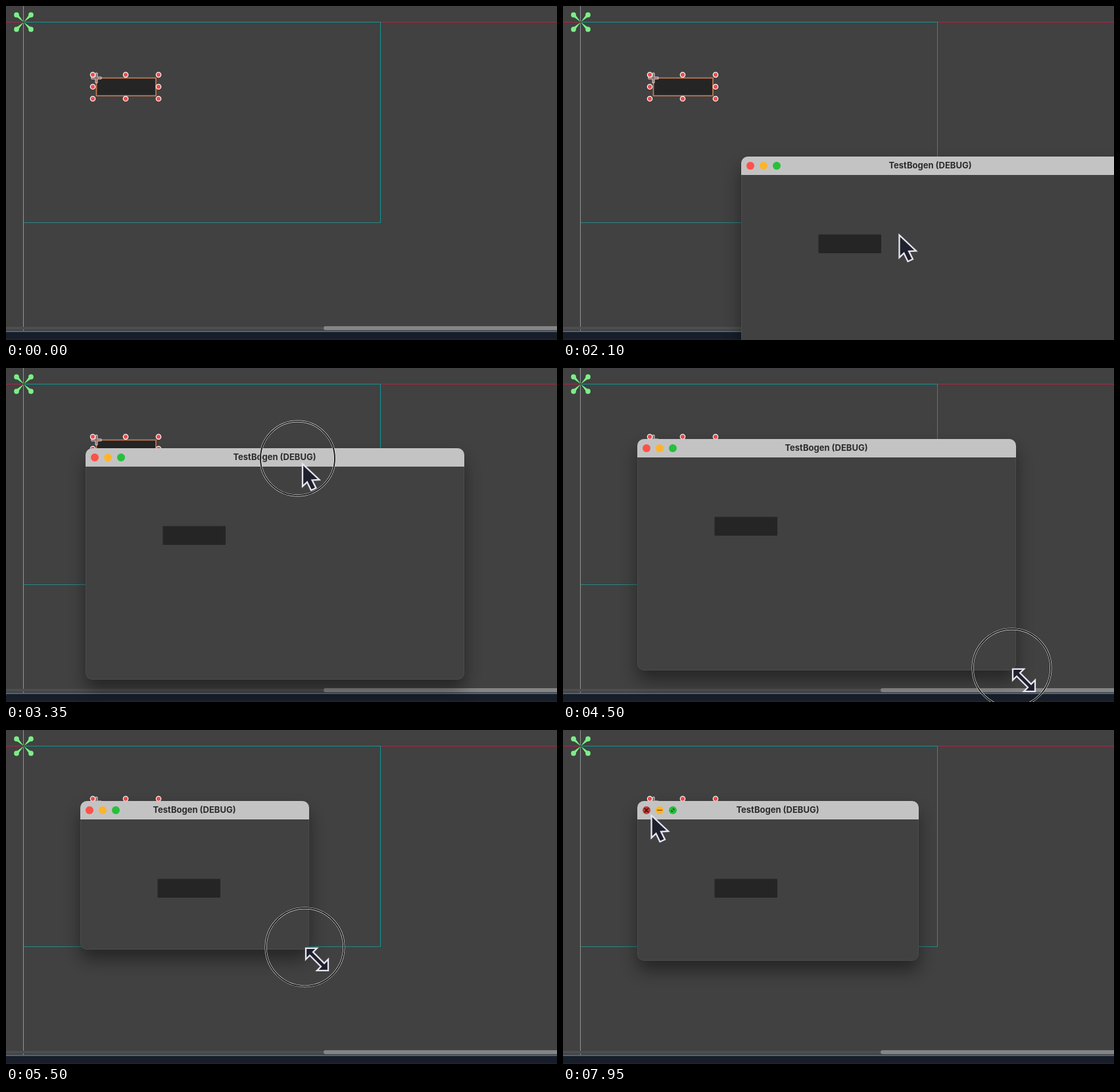
An HTML page that plays this animation: 838x508 px, repeating every 8 s.

```html
<!DOCTYPE html>
<html lang="de">
<head>
<meta charset="utf-8">
<title>Fenster ziehen</title>
<style>
html, body { margin: 0; width: 100%; height: 100%; overflow: hidden; background: #414141; }
svg { display: block; width: 100%; height: 100%; }
text { font: 700 13px Inter, "Open Sans", sans-serif; fill: #2b2b2b; text-anchor: middle; }
.cursor { fill: #1e202d; stroke: #e6e6f0; stroke-width: 2.3; }
.glyph { fill: none; stroke-width: 1.4; stroke-linecap: round; }
</style>
</head>
<body>
<svg viewBox="0 0 838 508">
  <defs>
    <filter id="blur" x="-30%" y="-30%" width="160%" height="160%"><feGaussianBlur stdDeviation="13"/></filter>
    <clipPath id="round"><rect id="clip" rx="10"/></clipPath>
  </defs>

  <!-- editor -->
  <rect width="838" height="508" fill="#414141"/>
  <path d="M0 24.5H838" stroke="#ae2440"/>
  <path d="M27 329.5H569" stroke="#2b8581"/>
  <path d="M26.5 0V495" stroke="#8f9692"/>
  <path d="M27 24.5H569.5V330" fill="none" stroke="#0c9896"/>
  <rect y="488" width="490" height="4" fill="#4e4e4e"/>
  <path d="M838 487H486a3 3 0 0 0 0 6H838Z" fill="#858585"/>
  <rect y="494" width="838" height="14" fill="#171e29"/>
  <rect y="494" width="838" height="2" fill="#456882"/>
  <rect y="506.5" width="838" height="1.5" fill="#272231"/>
  <g id="gizmo"></g>
  <rect x="137.5" y="109.5" width="90.5" height="27" fill="#252525" stroke="#c87a52" stroke-width="1.7"/>
  <path d="M136 102h3v6h6v3h-6v6h-3v-6h-6v-3h6Z" fill="#8f7878" fill-opacity=".7" stroke="#e6d2d2"/>
  <g id="handles" fill="#f24b4b" stroke="#fff" stroke-width="1.2"></g>

  <!-- app window -->
  <g id="win">
    <rect id="shadow" y="15" rx="12" fill="#000" opacity=".42" filter="url(#blur)"/>
    <g clip-path="url(#round)">
      <rect id="body" fill="#414141"/>
      <rect id="bar" height="28" fill="#c3c3c3"/>
    </g>
    <rect id="edge" x=".5" y=".5" rx="9.5" fill="none" stroke="#fff" stroke-opacity=".06"/>
    <rect x="117.5" y="118.5" width="95.5" height="28.5" rx="1" fill="#252525"/>
    <circle id="close" cx="14" cy="14" r="6"/>
    <circle cx="34" cy="14" r="6" fill="#fcb52b"/>
    <circle cx="54" cy="14" r="6" fill="#26c03b"/>
    <g id="glyphs" class="glyph">
      <path d="M11.3 11.3l5.4 5.4m0-5.4l-5.4 5.4" stroke="#3c0a0a"/>
      <path d="M30.5 14h7" stroke="#8c5a06"/>
      <path d="M51.6 13v3.4H55ZM56.4 15v-3.4H53Z" fill="#0b5715"/>
    </g>
    <text id="title" y="18.2">TestBogen (DEBUG)</text>
  </g>

  <!-- pointer -->
  <g id="pointer">
    <g id="ring" fill="none">
      <circle stroke="#e8e8e8" stroke-width="3"/>
      <circle stroke="#0c0c0c" stroke-width="1.7"/>
    </g>
    <path id="arrow" class="cursor" transform="translate(6 5.5)" d="M1.5 3V37L8.5 30.5L14.5 43L22 39.5L16 27.5L27 27Z"/>
    <path id="sizer" class="cursor" transform="translate(18.5 18.5)" d="M-17-17H0L-6-11L11 6L17 0V17H0L6 11L-11-6L-17 0Z"/>
  </g>
</svg>
<script>
const LOOP = 8000, STEP = 50, LAG = 20;
const $ = id => document.getElementById(id);
const set = (el, attrs) => { for (const k in attrs) el.setAttribute(k, attrs[k]); };
const show = (el, on) => { el.style.display = on ? '' : 'none'; };
const within = (t, a, b) => t >= a && t < b;
const add = (a, b) => a.map((v, i) => v + b[i]);

function ease(t, start, end) {
  const v = Math.max(0, Math.min(1, (t - start) / (end - start)));
  return v * v * (3 - 2 * v);
}
const glide = (t, start, end, from, to) =>
  from.map((v, i) => v + (to[i] - v) * ease(t, start, end));

// key points
const spawn = [271, 229], parked = [113, 108], nearPark = [121, 122];
const large = [576, 352], small = [348, 226], medium = [428, 243], huge = [671, 372];
const below = [590, 520], rest = [504, 340];
const grip = [322.5, 15.5], corner = [-6.5, -3.7], closeButton = [14, 13.5];

function place(t) {
  return t < 3350 ? glide(t, 2950, 3350, spawn, nearPark) : glide(t, 3350, 3750, nearPark, parked);
}

// the corner is pulled out and pushed back in, twice
function size(t) {
  if (t < 5050) return glide(t, 4750, 5050, large, huge);
  if (t < 5600) return glide(t, 5050, 5480, huge, small);
  if (t < 6100) return glide(t, 5600, 5900, small, huge);
  return glide(t, 6100, 6350, huge, medium);
}

function pointer(t) {
  const hold = add(place(t), grip);
  const pull = add(add(place(t), size(t)), corner);
  if (t < 2050) return glide(t, 1450, 2000, below, rest);
  if (t < 2950) return glide(t, 2100, 2550, rest, hold);
  if (t < 4400) return glide(t, 3900, 4400, hold, pull);
  return glide(t, 6750, 7550, pull, add(parked, closeButton));
}

function buildEditor() {
  let marks = '';
  for (const sx of [-1, 1]) for (const sy of [-1, 1]) {
    const x = 27 + 11 * sx, y = 24.5 + 11 * sy;
    marks += `<path d="M27 24.5L${x - 1.8 * sx} ${y + 1.8 * sy}L${x + 1.8 * sx} ${y - 1.8 * sy}Z"/>` +
      `<circle cx="${x}" cy="${y}" r="3.9"/>`;
  }
  $('gizmo').innerHTML =
    `<g fill="#1d3a22" stroke="#1d3a22">${marks}</g><g fill="#7fec8b">${marks}</g>`;

  let dots = '';
  for (const dx of [-1, 0, 1]) for (const dy of [-1, 0, 1]) {
    if (dx || dy) dots += `<circle cx="${182 + 50 * dx}" cy="${122.8 + 18.2 * dy}" r="3.7"/>`;
  }
  $('handles').innerHTML = dots;
}

function drawWindow(t) {
  const [x, y] = place(t), [width, height] = size(t - LAG);
  const open = ease(t, 1150, 1400), scale = 0.9 + 0.1 * open, inset = (1 - scale) / 2;
  show($('win'), t >= 1200);
  set($('win'), {
    opacity: open,
    transform: `translate(${x + width * inset} ${y + height * inset}) scale(${scale})`
  });
  for (const id of ['clip', 'body', 'shadow']) set($(id), { width, height });
  set($('bar'), { width });
  set($('edge'), { width: width - 1, height: height - 1 });
  set($('title'), { x: width / 2 - 0.5 });
  set($('close'), { fill: t >= 7650 ? '#bd3d38' : '#fc5149' });
  show($('glyphs'), t >= 7500);
}

function drawPointer(t) {
  const resizing = within(t, 4400, 6750);
  show($('pointer'), t >= 1450);
  set($('pointer'), { transform: `translate(${pointer(t).join(' ')})` });
  show($('arrow'), !resizing);
  show($('sizer'), resizing);
  show($('ring'), within(t, 2950, 3750) || within(t, 4450, 6450) || within(t, 7650, 7900));
  for (const c of $('ring').children) set(c, { r: t < 3750 ? 56.5 : 59.4 });
}

function frame(now) {
  const t = Math.floor(now % LOOP / STEP) * STEP;
  drawWindow(t);
  drawPointer(t);
  requestAnimationFrame(frame);
}

buildEditor();
requestAnimationFrame(frame);
</script>
</body>
</html>
```
